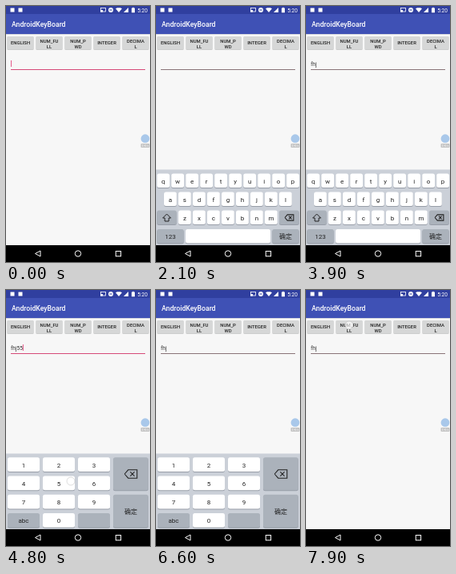
An HTML page with a canvas for the animation above (8 s loop, 180 by 320 pixels).

```html
<!DOCTYPE html>
<html lang="zh">
<head>
<meta charset="utf-8">
<style>
html, body { margin: 0; width: 100%; height: 100%; overflow: hidden; background: #f7f7f7; }
canvas { display: block; width: 180px; height: 320px; }
</style>
</head>
<body>
<canvas id="stage"></canvas>
<script>
const LOOP = 8000;
const canvas = document.getElementById('stage');
const g = canvas.getContext('2d');
const ratio = window.devicePixelRatio || 1;
canvas.width = 180 * ratio;
canvas.height = 320 * ratio;

const FONT = 'Roboto, "Noto Sans CJK SC", "Noto Sans CJK", sans-serif';
const BLUE = '#3f51b5', INK = '#222', KEY = '#fff', GREY_KEY = '#abb2bb';

// Values hold from their time until the next entry.
const TYPED = [[0, ''], [2500, 'f'], [2950, 'fh'], [3400, 'fhj'], [4600, 'fhj5'],
  [4800, 'fhj55'], [6100, 'fhj5'], [6300, 'fhj']];
const BLINKS = [[0, -400], [600, 650], [1600, 1600], [2500, 2500], [2950, 2950],
  [3400, 3400], [4600, 4600], [4800, 4800], [6100, 6100]];
const TAPS = [[850, 18, 46], [2500, 72, 242], [2950, 108, 242], [3400, 126, 242],
  [4200, 18, 288], [4600, 81, 239], [4800, 81, 239], [6100, 156, 230],
  [6300, 156, 230], [7080, 156, 276], [7900, 54, 44]];

const clamp = v => Math.max(0, Math.min(1, v));
const at = (list, t) => list.filter(e => e[0] <= t).pop()[1];

function rect(x, y, w, h, color) {
  g.fillStyle = color;
  g.fillRect(x, y, w, h);
}

function round(x, y, w, h, r, color) {
  g.fillStyle = color;
  g.beginPath();
  g.roundRect(x, y, w, h, r);
  g.fill();
}

function disc(x, y, r, color) {
  g.fillStyle = color;
  g.beginPath();
  g.arc(x, y, r, 0, 7);
  g.fill();
}

function poly(points, color, fill, width = 1) {
  g.beginPath();
  points.forEach(([x, y]) => g.lineTo(x, y));
  if (fill) {
    g.closePath();
    g.fillStyle = color;
    g.fill();
  } else {
    g.strokeStyle = color;
    g.lineWidth = width;
    g.stroke();
  }
}

function text(s, x, y, size, color = INK, align = 'center', weight = 400) {
  g.font = `${weight} ${size}px ${FONT}`;
  g.textAlign = align;
  g.fillStyle = color;
  g.fillText(s, x, y);
}

function statusBar() {
  rect(0, 0, 180, 10, '#303f9f');
  rect(5.5, 2.5, 5, 5, '#fff');
  rect(15.5, 2.5, 5, 5, '#fff');
  g.strokeStyle = '#fff';
  g.lineWidth = .8;
  g.strokeRect(118.5, 2.5, 6, 4.5);
  rect(118, 5, 3, 2.5, '#fff');
  disc(131, 5, 3, '#fff');
  rect(129.3, 4.5, 3.4, 1, '#303f9f');
  poly([[137, 3.2], [139, 2.2], [143, 2.2], [145, 3.2], [141, 8]], '#fff', true);
  poly([[153, 2], [153, 8], [147, 8]], '#fff', true);
  rect(157, 2.5, 4, 5.8, '#fff');
  rect(158.2, 1.8, 1.6, 1, '#fff');
  text('5:20', 177, 7.6, 6.6, '#fff', 'right');
}

function navBar() {
  rect(0, 299, 180, 21, '#000');
  poly([[43, 306], [36.5, 309.5], [43, 313], [43, 306]], '#fff');
  g.beginPath();
  g.arc(90, 309.5, 3.7, 0, 7);
  g.stroke();
  g.strokeRect(137.3, 306.5, 6.3, 6.3);
}

function buttons(t) {
  const press = clamp((t - 800) / 200) * clamp((1600 - t) / 350);
  const labels = ['ENGLISH', 'NUM_FU|LL', 'NUM_P|WD', 'INTEGER', 'DECIMA|L'];
  labels.forEach((label, i) => {
    const x = 1.5 + 36 * i, lines = label.split('|');
    round(x, 38.6, 33, 16.4, 1, '#c4c4c4');
    round(x, 38, 33, 16.4, 1, '#d6d7d7');
    if (!i) round(x, 38, 33, 16.4, 1, `rgba(0,0,0,${.17 * press})`);
    lines.forEach((line, k) =>
      text(line, x + 16.5, (lines.length > 1 ? 45.8 : 48.4) + k * 6.8, 5.9, INK, 'center', 500));
  });
}

function field(t) {
  const typed = at(TYPED, t);
  const on = (t - at(BLINKS, t)) % 1000 < 500;
  text(typed, 6, 74.8, 6.6, '#333', 'left');
  if (on) rect(6 + g.measureText(typed).width, 68, .8, 8, '#e0346f');
  rect(6, 79, 168, 1, on ? '#d64a78' : '#8a7478');
}

function key(x, y, w, h, label, grey, size = 8) {
  round(x, y + 1, w, h, 2.5, '#989ea8');
  round(x, y, w, h, 2.5, grey ? GREY_KEY : KEY);
  text(label, x + w / 2, y + h / 2 + size * .42, size);
}

function eraser(x, y, s) {
  const p = (...pts) => poly(pts.map(([a, b]) => [x + a * s, y + b * s]), INK, false, 1.1);
  p([-6, 0], [-2.5, -4], [6, -4], [6, 4], [-2.5, 4], [-6, 0]);
  p([-.5, -2], [3.5, 2]);
  p([3.5, -2], [-.5, 2]);
}

function letters() {
  ['qwertyuiop', 'asdfghjkl', 'zxcvbnm'].forEach((row, r) =>
    [...row].forEach((c, i) =>
      key([1.2, 10, 28][r] + 18 * i, 209.5 + 23 * r, 15.8, 17.5, c)));
  key(1.2, 255.5, 24.5, 17.5, '', true);
  poly([[13.5, 260], [8.5, 265], [11, 265], [11, 269], [16, 269], [16, 265], [18.5, 265], [13.5, 260]], INK);
  key(154, 255.5, 24.8, 17.5, '', true);
  eraser(166.5, 264.5, .9);
  key(1.2, 279, 33.5, 17.5, '123', true);
  key(37, 279, 106, 17.5, '');
  key(145.3, 279, 33.5, 17.5, '确定', true);
}

function digits() {
  ['1', '2', '3', '4', '5', '6', '7', '8', '9', 'abc', '0', ''].forEach((c, i) =>
    key(2 + 44 * (i % 3), 209.3 + 23.2 * (i / 3 | 0), 40, 17.8, c, i === 9 || i === 11));
  key(134, 209.3, 43.8, 41, '', true);
  eraser(156, 230, 1.3);
  key(134, 255.7, 43.8, 41, '确定', true);
}

function keyboard(t) {
  if (t < 1094 || t > 7500) return;
  const rise = 1 - (1 - clamp((t - 1094) / 450)) ** 2;
  const fall = clamp((t - 7080) / 420) ** 1.5;
  g.save();
  g.translate(0, 116 * (1 - rise + fall));
  rect(0, 204.5, 180, 94.5, '#cbd0d8');
  t < 4250 ? letters() : digits();
  g.restore();
}

function bubble() {
  disc(174, 165.7, 5.4, '#a9c8ea');
  round(168.5, 172, 11, 5, 1, '#c3c3c3');
  text('0 K/s', 174, 175.8, 3.6, '#fff');
}

function touches(t) {
  for (const [start, x, y] of TAPS) {
    const age = t - start;
    if (age < -80 || age > 130) continue;
    g.globalAlpha = .65 * clamp((age + 80) / 60) * clamp((130 - age) / 60);
    disc(x, y, 5, '#fff');
    g.strokeStyle = '#aaa';
    g.lineWidth = .6;
    g.stroke();
    g.globalAlpha = 1;
  }
}

function draw(t) {
  g.setTransform(ratio, 0, 0, ratio, 0, 0);
  rect(0, 0, 180, 320, '#f7f7f7');
  rect(0, 35, 180, 1, '#d9dae0');
  rect(0, 10, 180, 25, BLUE);
  text('AndroidKeyBoard', 7, 25.8, 8.7, '#fff', 'left', 500);
  statusBar();
  buttons(t);
  field(t);
  navBar();
  keyboard(t);
  bubble();
  touches(t);
}

const begin = performance.now();
function frame() {
  draw((performance.now() - begin) % LOOP);
  requestAnimationFrame(frame);
}
frame();
</script>
</body>
</html>
```
